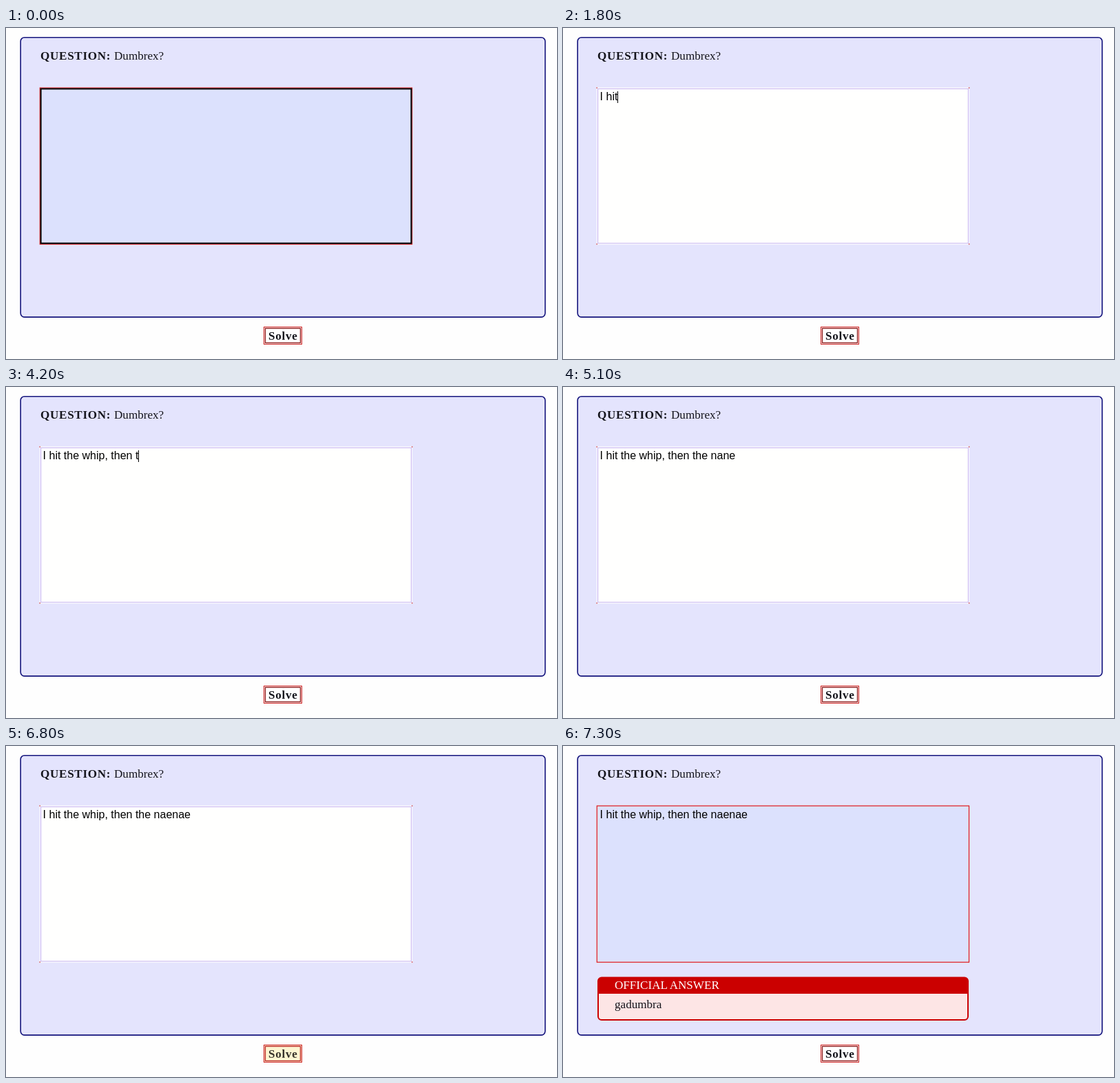
Animation, 800 px wide and 481 px high, one loop 8000 ms. Source, as an HTML page:

```html
<!DOCTYPE html>
<html lang="en">
<head>
<meta charset="utf-8">
<title>Question form</title>
<style>
  html, body { margin: 0; width: 100%; height: 100%; overflow: hidden; background: #fefefe; }
  svg { display: block; width: 800px; height: 481px; }
  text { font: 17.1px "Liberation Serif", serif; fill: #15151c; white-space: pre; }
  .bold { font-weight: bold; letter-spacing: .7px; }
  #typed { font: 16px "Liberation Sans", sans-serif; fill: #000; }
  .line { fill: none; }

  /* answer field: pressed, focus or idle */
  .field { fill: #dce1fd; }
  .outer { stroke: #e01a1a; stroke-width: 1.2; }
  .inner { stroke: none; stroke-width: 2; }
  .corners { fill: #d04040; display: none; }
  [data-field="pressed"] .inner { stroke: #000; }
  [data-field="focus"] .field { fill: #fffffe; }
  [data-field="focus"] .outer { stroke: #fbf8ff; }
  [data-field="focus"] .inner { stroke: #cdbdf3; stroke-width: 1.2; }
  [data-field="focus"] .corners { display: block; }

  .frame { fill: #fff; stroke: #cc1f1f; }
  .face { fill: #fff; stroke: #8a1212; stroke-width: 1.3; }
  .hover .frame { fill: #fdf3d4; }
  .hover .face { fill: #fdf6d2; stroke: #bb2020; }
  .hover text { fill: #37332c; }
</style>
</head>
<body>
<svg id="stage" viewBox="0 0 800 481" data-field="pressed">
  <rect x="21.2" y="13.7" width="761.6" height="406.4" rx="5.5" fill="#e4e4fd" stroke="#14147c" stroke-width="1.6"/>
  <text class="bold" x="50" y="46">QUESTION:</text>
  <text x="157" y="46">Dumbrex?</text>

  <rect class="field" x="49.5" y="87" width="540" height="227"/>
  <rect class="line outer" x="49.3" y="87" width="540.2" height="227.2"/>
  <rect class="line inner" x="50.6" y="88.4" width="537.8" height="224.4"/>
  <path class="corners" d="M48.5 86.3h1.4v1.4h-1.4zM588.9 86.3h1.4v1.4h-1.4zM48.5 313.3h1.4v1.4h-1.4zM588.9 313.3h1.4v1.4h-1.4z"/>
  <text id="typed" x="53.6" y="105"></text>
  <rect id="caret" y="92" width="1" height="17"/>

  <g id="answer">
    <rect x="51" y="336.5" width="537" height="61.5" rx="5" fill="#fde5e5" stroke="#cb0000" stroke-width="2"/>
    <path d="M51 360v-18.5q0-5 5-5h527q5 0 5 5V360z" fill="#cb0000"/>
    <text x="75" y="353" style="fill:#fff">OFFICIAL ANSWER</text>
    <text x="75" y="381">gadumbra</text>
  </g>

  <g id="solve">
    <rect class="frame" x="374.5" y="434.5" width="55" height="25"/>
    <rect class="face" x="376.5" y="436.5" width="51" height="21"/>
    <text class="bold" x="381" y="453">Solve</text>
  </g>
</svg>
<script>
  const LOOP = 8000, STEP = 100, TEXT_X = 53.6;
  const $ = id => document.getElementById(id);
  const stage = $('stage'), typed = $('typed'), caret = $('caret');

  // Runs of one entry per step: '<' deletes, '!' hides the caret, '' shows it.
  const runs = [
    [200, ['']], [1300, ['!']], [1400, [...'I hit th']], [2200, ['e ']],
    [2400, ['w']], [2600, ['h', 'pi', '<']], [3000, ['<']], [3200, ['i', 'p']],
    [3500, [...', then the nan']], [5000, ['e', '!']], [5400, ['']],
    [5600, ['<<', 'e', 'n', 'ae']], [6200, ['!']]
  ];
  const keys = runs.flatMap(([start, list]) =>
    list.map((key, i) => ({ at: start + i * STEP, key })));

  function typing(t) {
    let text = '', on = false;
    for (const { at, key } of keys) {
      if (at > t) break;
      on = key !== '!';
      if (!on) continue;
      for (const c of key) text = c === '<' ? text.slice(0, -1) : text + c;
    }
    return { text, on };
  }

  const show = (el, on) => el.style.display = on ? '' : 'none';

  function draw(now) {
    const t = now % LOOP;
    const { text, on } = typing(t);
    stage.dataset.field = t < 200 ? 'pressed' : t < 7000 ? 'focus' : 'idle';
    if (typed.textContent !== text) typed.textContent = text;
    show(caret, on);
    if (on) caret.setAttribute('x', Math.floor(TEXT_X + (text && typed.getComputedTextLength())));
    show($('answer'), t >= 7100);
    $('solve').classList.toggle('hover', t >= 6800 && t < 7300);
  }

  const begin = performance.now();
  function tick() {
    draw(performance.now() - begin);
    requestAnimationFrame(tick);
  }
  tick();
</script>
</body>
</html>
```
